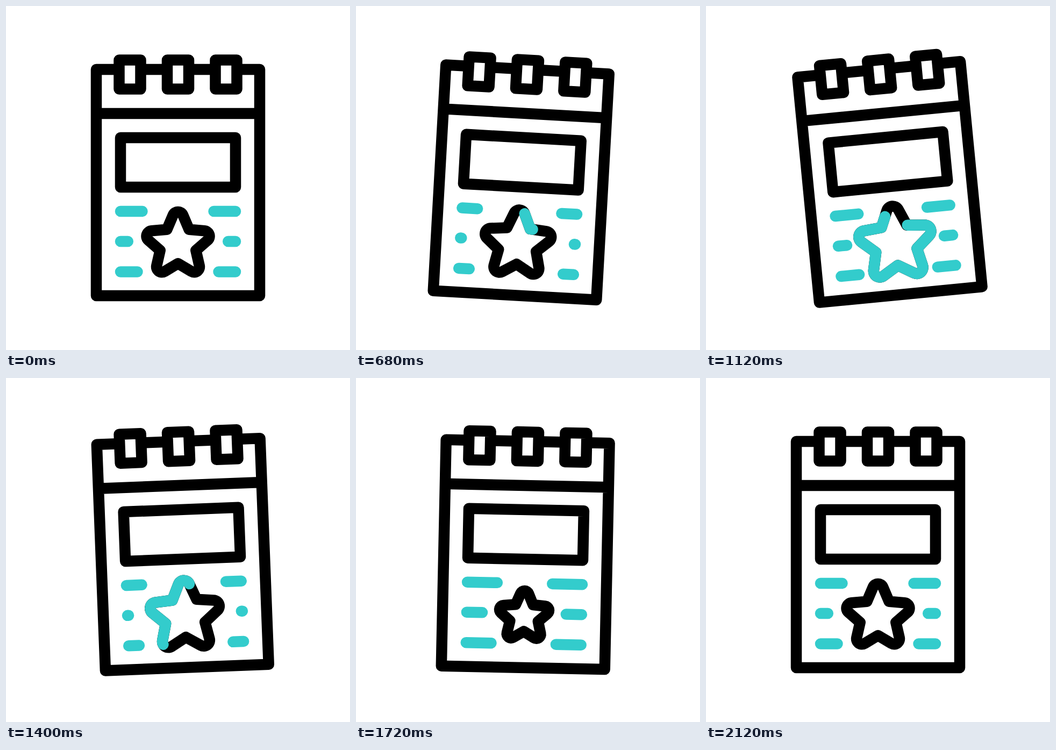
An HTML page for the animation above (2.2 s loop, 640x640 px).

```html
<!DOCTYPE html>
<html lang="en">
<head>
<meta charset="utf-8">
<title>Notepad</title>
<style>
  html, body { margin: 0; height: 100%; overflow: hidden; background: #fff; }
  svg { display: block; width: 100%; height: 100%; }
  g { fill: none; stroke: #000; stroke-width: 20.5; stroke-linecap: round; stroke-linejoin: round; }
  .teal { stroke: #33cccc; }
</style>
</head>
<body>
<svg viewBox="0 0 640 640">
  <g id="pad">
    <path d="M168 118H472V539H168ZM168 200H472M213 245H427V337H213Z"/>
    <path fill="#fff" d="M210.5 100.5h40v54h-40zM300 100.5h40v54h-40zM389.5 100.5h40v54h-40z"/>
    <path id="dashes" class="teal"/>
    <path id="star"/>
    <path id="trace" class="teal" pathLength="1"/>
  </g>
</svg>
<script>
const LOOP = 2200, STEP = 40;
const [pad, dashes, star, trace] =
  ['pad', 'dashes', 'star', 'trace'].map(id => document.getElementById(id));

// Each track is a list of [time in ms, value], eased in and out between keys.
const swing = [[200, 0], [680, 3.2], [1160, -5.7], [1640, 1.3], [2120, 0]];
const size = [[200, 1], [510, 1.25], [880, .8], [1210, 1.23], [1740, .785], [2120, 1]];
const stretch = [[200, 0], [640, -13], [950, 13], [1340, -13.5], [1740, 15.5], [2120, 0]];
const traceEnd = [[560, 0], [1240, 1]];
const traceStart = [[1000, 0], [1720, 1]];

function at(track, t) {
  if (t <= track[0][0]) return track[0][1];
  const i = track.findIndex(key => key[0] > t);
  if (i < 0) return track[track.length - 1][1];
  const [t0, a] = track[i - 1], [t1, b] = track[i];
  const u = (t - t0) / (t1 - t0);
  return a + (b - a) * u * u * (3 - 2 * u);
}

const polar = (deg, r, x = 0, y = 0) => {
  const a = deg * Math.PI / 180;
  return [x + r * Math.cos(a), y + r * Math.sin(a)];
};

// Five-pointed star with rounded tips, starting just right of the top tip.
function starPath(scale) {
  const round = 10 * scale;
  const side = (k, turn) => {
    const dir = 72 * k - 90;
    return polar(dir + turn, round, ...polar(dir, 51 * scale, 320, 444));
  };
  let d = 'M' + side(0, 67);
  for (let k = 1; k <= 5; k++) {
    const notch = polar(72 * k - 126, 35 * scale, 320, 444);
    d += `L${notch}L${side(k, -67)}A${round} ${round} 0 0 1 ${side(k, 67)}`;
  }
  return d + 'Z';
}

function dashPath(extra) {
  return [[382, 40.5], [438, 13.8], [494.5, 31.5]].map(([y, length]) => {
    const w = Math.max(.1, length + extra);
    return `M213 ${y}h${w}M427 ${y}h${-w}`;
  }).join('');
}

function draw(now) {
  const t = Math.floor(now % LOOP / STEP) * STEP;
  const start = at(traceStart, t), length = at(traceEnd, t) - start;
  const outline = starPath(at(size, t));
  pad.setAttribute('transform', `rotate(${at(swing, t)} 320 100)`);
  dashes.setAttribute('d', dashPath(at(stretch, t)));
  star.setAttribute('d', outline);
  trace.setAttribute('d', outline);
  trace.setAttribute('stroke-dasharray', `${length} 2`);
  trace.setAttribute('stroke-dashoffset', -start);
  trace.setAttribute('visibility', length > 0 ? 'visible' : 'hidden');
}

const begin = performance.now();
function tick() {
  draw(performance.now() - begin);
  requestAnimationFrame(tick);
}
tick();
</script>
</body>
</html>
```
